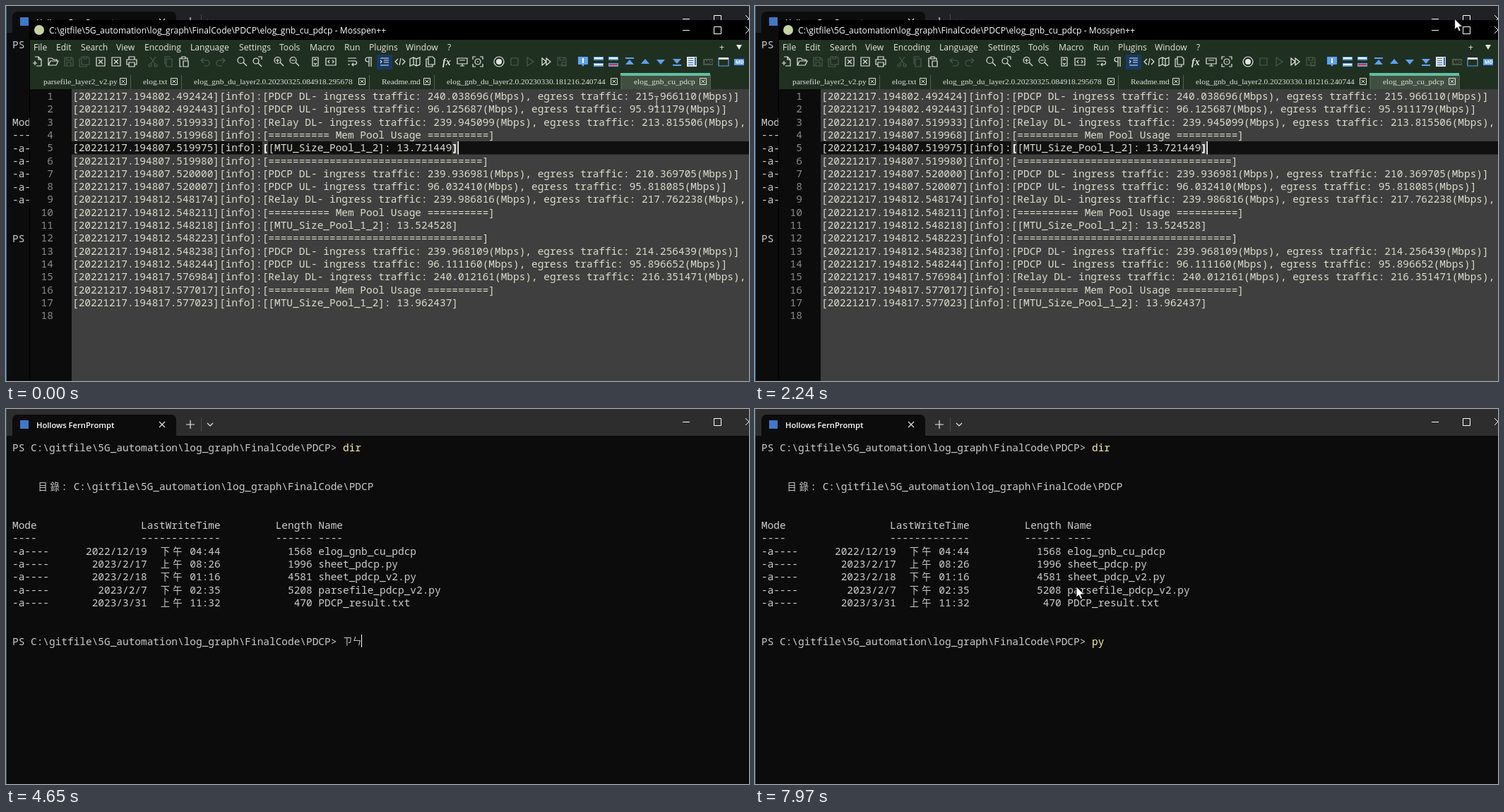
An HTML page with a canvas for the animation above (8 s loop, 1052 by 532 pixels).

```html
<!DOCTYPE html>
<html lang="en">
<head>
<meta charset="utf-8">
<title>Log viewer over a terminal</title>
<style>
  html, body { margin: 0; width: 100%; height: 100%; overflow: hidden; background: #0c0c0c; }
  canvas { display: block; }
</style>
</head>
<body>
<canvas id="stage" width="1052" height="532"></canvas>
<script>
const W = 1052, H = 532, LOOP = 8000;
const CELL = 8.667, LINE = 18.32;
const MONO = '14.445px "Noto Sans Mono", monospace';
const UI = '12.15px "Open Sans", sans-serif';
const CJK = '13.2px "Noto Sans CJK TC", "Noto Sans CJK JP", "Noto Sans CJK", sans-serif';
const PATH = 'C:\\gitfile\\5G_automation\\log_graph\\FinalCode\\PDCP';
const stage = document.getElementById('stage').getContext('2d');
let g = stage;

function box(x, y, w, h, color) {
  g.fillStyle = color;
  g.fillRect(x, y, w, h);
}

function disc(x, y, r, color) {
  g.fillStyle = color;
  g.beginPath();
  g.arc(x, y, r, 0, 7);
  g.fill();
}

function label(text, x, y, color, font = UI) {
  g.font = font;
  g.fillStyle = color;
  g.fillText(text, x, y);
}

// Text on a fixed character grid; wide characters take two cells.
function grid(text, x, y, color, font = MONO) {
  for (const ch of text) {
    const wide = ch > '\u2e80';
    if (ch !== ' ') label(ch, x + (wide ? 1.8 : 0), y, color, wide ? CJK : font);
    x += wide ? 2 * CELL : CELL;
  }
}

function draw(d, x, y, color, fill, width = 1.2) {
  g.save();
  g.translate(x, y);
  g.lineWidth = width;
  g.strokeStyle = g.fillStyle = color;
  const p = new Path2D(d);
  if (fill) g.fill(p); else g.stroke(p);
  g.restore();
}

function layer(paint) {
  const c = document.createElement('canvas');
  c.width = W;
  c.height = H;
  g = c.getContext('2d');
  paint();
  g = stage;
  return c;
}

function windowButtons(y) {
  draw('M-5 .5h10M39.5-4.5h10v10h-10zM84-5l10 10M94-5l-10 10', 963, y, '#fff', false, 1);
}

const termY = row => 60 + LINE * row;

function paintTerminal() {
  box(1, 38, W, H, '#0c0c0c');
  g.beginPath();
  g.roundRect(9, 8, 232, 34, [7, 7, 0, 0]);
  g.fill();
  box(20, 16, 12, 12, '#3f78c8');
  label('Hollows FernPrompt', 43, 27, '#fff', '600 11.2px "Open Sans", sans-serif');
  draw('M-4-4l8 8M4-4l-8 8', 221, 22, '#e0e0e0');
  draw('M-6 0h12M0-6v12M24-2l4 4 4-4', 261, 22, '#e8e8e8');
  box(276, 12, 1, 20, '#4a4a4a');
  windowButtons(18);

  const files = [
    ['2022/12/19', '下午 04:44', '1568', 'elog_gnb_cu_pdcp'],
    ['2023/2/17', '上午 08:26', '1996', 'sheet_pdcp.py'],
    ['2023/2/18', '下午 01:16', '4581', 'sheet_pdcp_v2.py'],
    ['2023/2/7', '下午 02:35', '5208', 'parsefile_pdcp_v2.py'],
    ['2023/3/31', '上午 11:32', '470', 'PDCP_result.txt']
  ].map(([date, time, size, name]) =>
    `-a----${date.padStart(16)}  ${time}${size.padStart(15)} ${name}`);
  const rows = [
    `PS ${PATH}>`, '', '', `    目錄: ${PATH}`, '', '',
    'Mode' + 'LastWriteTime'.padStart(30) + 'Length'.padStart(15) + ' Name',
    '----' + '-------------'.padStart(30) + '------'.padStart(15) + ' ----',
    ...files, '', '', `PS ${PATH}>`
  ];
  rows.forEach((text, i) => grid(text, 9, termY(i), '#cccccc', '500 ' + MONO));
  grid('dir', 477, termY(0), '#f9f1a5', '500 ' + MONO);
}

const LOG = `194802.492424 PDCP DL 240.038696 215.966110
194802.492443 PDCP UL 96.125687 95.911179
194807.519933 Relay DL 239.945099 213.815506
194807.519968 usage
194807.519975 13.721449
194807.519980 rule
194807.520000 PDCP DL 239.936981 210.369705
194807.520007 PDCP UL 96.032410 95.818085
194812.548174 Relay DL 239.986816 217.762238
194812.548211 usage
194812.548218 13.524528
194812.548223 rule
194812.548238 PDCP DL 239.968109 214.256439
194812.548244 PDCP UL 96.111160 95.896652
194817.576984 Relay DL 240.012161 216.351471
194817.577017 usage
194817.577023 13.962437`.split('\n');

function logLine(entry) {
  const [time, kind, dir, ingress, egress] = entry.split(' ');
  const bar = '='.repeat(10);
  const body = dir
    ? `${kind} ${dir}- ingress traffic: ${ingress}(Mbps), egress traffic: ${egress}(Mbps)` +
      (kind === 'Relay' ? ', ' : ']')
    : kind === 'usage' ? `${bar} Mem Pool Usage ${bar}]`
    : kind === 'rule' ? '='.repeat(35) + ']'
    : `[MTU_Size_Pool_1_2]: ${kind}]`;
  return `[20221217.${time}][info]:[${body}`;
}

// Toolbar: centre x, path in a 16 px box, style code (d = dim, b = blue, f = filled).
const ICONS = [
  [45, 'M4 1h5l4 4v9H6M9 1v4h4M1 10h6M4 7v6'],
  [67, 'M1 13V3h5l2 2h5v2M1 13l3-6h11l-3 6z'],
  [89, 'M2 2h10l2 2v10H2zM5 2v4h6V2M5 14V9h6v5', 'd'],
  [111, 'M4 1h9l2 2v9H4zM4 4H1v11h10v-3M7 1v3h4V1', 'd'],
  [134, 'M2 2h12v12H2zM5 5l6 6M11 5l-6 6'],
  [156, 'M2 2h12v12H2zM5 5l6 6M11 5l-6 6'],
  [178, 'M4 5V1h8v4M4 12H1V5h14v7h-3M4 9h8v6H4z'],
  [208, 'M4 1l7 10M12 1L5 11M2 13a2 2 0 104 0 2 2 0 10-4 0M10 13a2 2 0 104 0 2 2 0 10-4 0', 'd'],
  [230, 'M5 4h8v11H5zM3 12V1h8', 'd'],
  [252, 'M5 3H2v12h3M5 1h5v3H5zM10 3h3v3M7 7h7v8H7z'],
  [282, 'M6 3L2 6l4 4M2 6h8a4 4 0 010 8H6', 'd'],
  [304, 'M10 3l4 3-4 4M14 6H6a4 4 0 000 8h4', 'd'],
  [334, 'M2 6a4.500 4.500 0 109 0 4.500 4.500 0 10-9 0M10 9l5 5'],
  [356, 'M2 7a4 4 0 108 0 4 4 0 10-8 0M9 10l5 5M9 1h5v4'],
  [386, 'M2 6a4.500 4.500 0 109 0 4.500 4.500 0 10-9 0M10 9l5 5M4 6h5M6.500 4v5'],
  [408, 'M2 6a4.500 4.500 0 109 0 4.500 4.500 0 10-9 0M10 9l5 5M4 6h5'],
  [438, 'M4 2h8v12H4zM6 6l2-2 2 2M6 10l2 2 2-2'],
  [460, 'M1 3h14v10H1zM6 6L4 8l2 2M10 6l2 2-2 2'],
  [490, 'M2 3h12M2 7h10a2 2 0 010 5H8M10 10l-2 2 2 2M2 12h3'],
  [513, 'M13 2H7a3 3 0 000 6h2M9 2v13M12 2v13'],
  [536, 'M2 3h12M7 6h7M7 9h7M2 13h12M2 6l2 2-2 2'],
  [558, 'M5 4L1 8l4 4M11 4l4 4-4 4M9 3L7 13'],
  [579, 'M1 4l5-2 4 2 5-2v10l-5 2-4-2-5 2zM6 2v10M10 4v10'],
  [601, 'M5 1h6l3 3v8H5zM5 4H2v11h9v-3'],
  [646, 'M1 3h14v8H1zM5 14h6M8 11v3M4 6h8'],
  [668, 'M1 5V1h4M11 1h4v4M15 11v4h-4M5 15H1v-4M4 8a4 4 0 108 0 4 4 0 10-8 0M7 8h2'],
  [698, 'M1 8a7 7 0 1014 0 7 7 0 10-14 0'],
  [698, 'M4 8a4 4 0 108 0 4 4 0 10-8 0', 'f'],
  [720, 'M3 3h10v10H3z', 'd'],
  [742, 'M4 2l9 6-9 6z', 'd'],
  [765, 'M2 3l6 5-6 5zM8 3l6 5-6 5z'],
  [787, 'M2 2h11l1 2v9H2zM5 2v4h6V2M8 9h6v5H8z', 'd'],
  [817, 'M1 1h14v11h-5l-2 3-2-3H1z', 'bf'],
  [839, 'M1 1h14v5H1zM1 10h14v5H1z', 'bf'],
  [860, 'M1 1h14v5H1zM1 10h14v5H1z', 'bf'],
  [883, 'M2 2h12v2H2zM2 12l6-7 6 7z', 'bf'],
  [905, 'M2 11l6-7 6 7z', 'bf'],
  [927, 'M2 5l6 7 6-7z', 'bf'],
  [950, 'M2 12h12v2H2zM2 4l6 7 6-7z', 'bf'],
  [971, 'M1 1h14v14H1z', 'f'],
  [994, 'M1 4h14v9H1z', 'df'],
  [1016, 'M1 3h14v11H1z', 'b'],
  [1016, 'M1 2h14v3H1z', 'f'],
  [1038, 'M1 4h14v9H1z', 'bf']
];

function paintToolbar() {
  box(525, 69, 22, 21, '#173a63');
  for (const [x, d, code = ''] of ICONS) {
    const color = code.includes('d') ? '#4c5a4c' : code.includes('b') ? '#5fa0f0' : '#e4e4e4';
    draw(d, x - 8, 71, color, code.includes('f'));
  }
  label('fx', 618, 84, '#e4e4e4', 'italic bold 14px "Liberation Serif", serif');
  box(816, 74, 2, 7, '#fff');
  for (const x of [839, 860]) {
    box(x - 6, 73, 12, 2, '#fff');
    box(x - 6, 82, 12, 2, x === 860 ? '#e03030' : '#fff');
  }
  for (let i = 0; i < 4; i++) box(966, 74 + i * 3, 7, 1, '#3070c0');
  box(975, 73, 2, 11, '#3070c0');
  label('MD', 989, 82, '#101810', 'bold 7px "Open Sans", sans-serif');
  label('MD', 1033, 82, '#fff', 'bold 7px "Open Sans", sans-serif');
}

function paintTabs() {
  const tabs = [
    ['parsefile_layer2_v2.py', 53, 166],
    ['elog.txt', 194, 238],
    ['elog_gnb_du_layer2.0.20230325.084918.295678', 266, 504],
    ['Readme.md', 532, 596],
    ['elog_gnb_du_layer2.0.20230330.181216.240744', 624, 861],
    ['elog_gnb_cu_pdcp', 889, 987]
  ];
  box(870, 95, 127, 24, '#405040');
  box(870, 95, 127, 4, '#62bfa0');
  for (const [text, x, close] of tabs) {
    label(text, x, 111, '#e0e0e0', '11.4px "Liberation Serif", serif');
    draw('M-4.500-4.500h9v9h-9zM-2.500-2.500l5 5M2.500-2.500l-5 5', close, 107, '#e0e0e0', false, 1);
    box(close + 10, 98, 1, 20, '#506050');
  }
}

const editY = row => 133 + 18.31 * row;

function paintEditor() {
  box(33, 20, W, H, '#000');
  box(34, 48, W, 71, '#203020');
  disc(47, 34, 7, '#c4d2a0');
  label(PATH + '\\elog_gnb_cu_pdcp - Mosspen++', 61, 38.5, '#fff');

  const menu = { File: 39, Edit: 71, Search: 106, View: 156, Encoding: 196, Language: 261,
    Settings: 330, Tools: 387, Macro: 430, Run: 479, Plugins: 514, Window: 566, '?': 625 };
  for (const name in menu) label(name, menu[name], 62.5, '#e4e4e4');
  label('+', 1010, 62.5, '#e4e4e4');
  draw('M-4-3h8l-4 7z', 1038, 58, '#e4e4e4', true);
  paintToolbar();
  paintTabs();

  box(34, 118, 59, H, '#0c0c0c');
  box(93, 118, W, H, '#3f3f3f');
  box(93, 192, W, 18.5, '#101010');
  for (const col of [31, 62]) box(94 + col * CELL, 192, CELL, 18.5, '#3f3f3f');
  LOG.forEach((entry, i) => grid(logLine(entry), 94, editY(i), '#dcdccc'));
  for (const [col, ch] of [[31, '['], [62, ']']]) {
    grid(ch, 94 + col * CELL, editY(4), '#fff', 'bold ' + MONO);
  }
  for (let n = 1; n <= 18; n++) {
    grid(String(n).padStart(2), 49.5, editY(n - 1), '#8a8a8a');
  }
}

const MOVES = [
  [0, 921, 136], [300, 955, 104], [860, 958, 103], [920, 957, 102], [1200, 955, 108],
  [1480, 893, 160], [1680, 413, 340], [1750, 413, 340], [2030, 1024, 14], [2170, 994, 16],
  [2840, 963, 38], [3110, 963, 38], [3510, 596, 222], [5310, 596, 222], [7230, 568, 231],
  [7570, 470, 258], [7710, 490, 262], [7970, 455, 252], [8000, 455, 252]
];

const TYPED = [
  [0, ''], [4240, 'ㄣㄗ'], [4650, 'ㄗㄣ'], [4920, 'ㄗㄣㄘㄔ'], [5310, 'ㄗㄣㄘ'],
  [5840, 'ㄗㄣ'], [5910, 'ㄗ'], [5980, ''], [6570, 'p'], [6900, 'py']
];

function pointer(t) {
  const i = MOVES.findIndex(m => m[0] > t);
  const [t0, x0, y0] = MOVES[i - 1], [t1, x1, y1] = MOVES[i];
  const k = (t - t0) / (t1 - t0);
  return [x0 + (x1 - x0) * k, y0 + (y1 - y0) * k];
}

const clamp = v => Math.max(0, Math.min(1, v));

function drawPrompt(t) {
  const text = TYPED.filter(s => s[0] <= t).pop()[1];
  const latin = text < '\u2e80';
  const step = latin ? CELL : 13.2;
  [...text].forEach((ch, i) =>
    label(ch, 477 + i * step, termY(15) - (latin ? 0 : 0.5), latin ? '#f9f1a5' : '#cccccc',
      latin ? '500 ' + MONO : CJK));
  if (t >= 3720 && t < 7400) box(Math.round(477 + text.length * step), 320, 1, 18, '#fff');
}

function drawEditor(t, x, y) {
  g.drawImage(editor, 0, 0);
  if (y >= 20 && y < 48 && x >= 942) box(x < 986 ? 942 : 986, 20, 44, 28, '#333');
  windowButtons(34);
  if (Math.floor((t + 180) / 530) % 2 === 0) box(639.5, 192, 1.5, 18.5, '#fff');

  g.globalAlpha = Math.min(clamp((t - 790) / 200), clamp((1540 - t) / 240));
  box(832, 131, W, 20, '#6a6a6a');
  box(833, 132, W, 18, '#2b2b2b');
  label(PATH, 837, 145, '#d0d0d0', '11.9px "Open Sans", sans-serif');
  g.globalAlpha = 1;

  if (t >= 2990) disc(962, 38, 11.5, 'rgba(184, 168, 20, .9)');
}

function render(t) {
  const [x, y] = pointer(t);
  const editing = t < 3110;
  box(0, 0, W, H, editing ? '#202124' : t < 3300 ? '#333333' : '#2d2d2d');
  g.drawImage(terminal, 0, 0);
  box(0, 0, 1, H, editing ? '#1673b0' : '#1d5a70');
  if (editing) drawEditor(t, x, y); else drawPrompt(t);

  if (t >= 3510 && t < 7230 && !(t >= 5250 && t < 5310)) return;
  if (editing && y > 118) {
    draw('M-3-7.500h2.500L0-7l.5-.5H3M0-7V7M-3 7.500h2.500L0 7l.5.5H3', x, y, '#d8d8d8', false, 1);
  } else {
    const arrow = 'M0 0v15l3.500-3 2.500 5.500 2.500-1L6 11h5z';
    draw(arrow, x, y, '#fff', true);
    draw(arrow, x, y, '#000', false, 0.8);
  }
}

const terminal = layer(paintTerminal);
const editor = layer(paintEditor);
const start = performance.now();

function frame() {
  render((performance.now() - start) % LOOP);
  requestAnimationFrame(frame);
}
frame();
</script>
</body>
</html>
```
